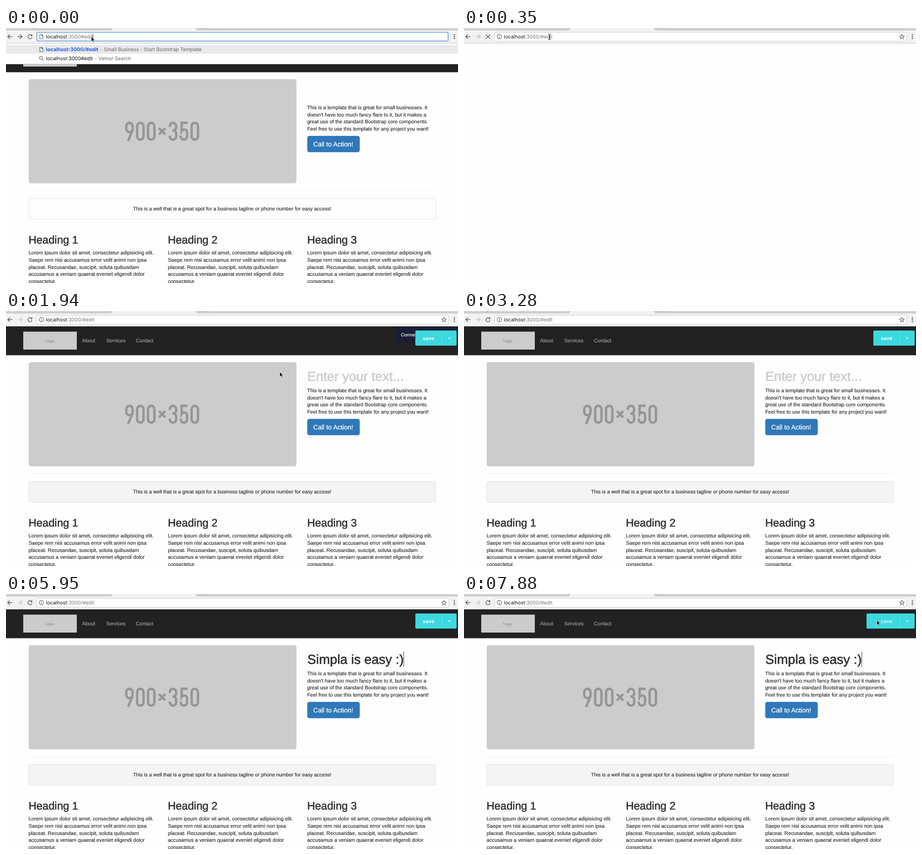
An HTML page that plays this animation: 996 by 562 pixels, repeating every 8000 ms.

```html
<!DOCTYPE html>
<html lang="en">
<head>
<meta charset="utf-8">
<title>Inline page editing</title>
<style>
html, body { margin: 0; width: 100%; height: 100%; overflow: hidden; background: #fefefe; }
svg { display: block; width: 996px; height: 562px; }
text { font-family: "Liberation Sans", Arial, sans-serif; font-size: 11.1px; fill: #2b2b2b;
  stroke: #2b2b2b; stroke-width: .18px; white-space: pre; text-rendering: geometricPrecision; }
.ui { font-family: Inter, Roboto, sans-serif; font-size: 10.9px; fill: #111; stroke: none; }
.dim { fill: #757575; }
.h1 { font-size: 28.95px; stroke-width: .65px; fill: #303030; stroke: #303030; }
.h1.empty { fill: #cbcbcb; stroke: #cbcbcb; }
.h2 { font-size: 24px; stroke: #303030; stroke-width: .6px; fill: #303030; }
.nav { fill: #a3a3a3; stroke: #a3a3a3; }
.icon { fill: none; stroke: #5a5a5a; stroke-width: 1.5; }
.thin { stroke-width: 1.1; }
</style>
</head>
<body>
<svg viewBox="0 0 996 562" xmlns="http://www.w3.org/2000/svg">
  <rect width="996" height="562" fill="#fefefe"/>

  <g id="page">
    <rect y="34" width="996" height="63.5" fill="#222"/>
    <rect x="38" y="45.5" width="118" height="39.5" fill="#ccc"/>
    <text x="85" y="69.3" style="font:bold 9px 'Liberation Mono',monospace;fill:#989898;stroke:none">logo</text>
    <text class="nav" x="167.5" y="69.3">About</text>
    <text class="nav" x="220.7" y="69.3">Services</text>
    <text class="nav" x="286.3" y="69.3">Contact</text>

    <rect x="50" y="112.7" width="590" height="229.6" rx="4.7" fill="#ccc"/>
    <g id="size" fill="none" stroke="#969696" stroke-width="5.3"></g>

    <text id="title" class="h1" x="664" y="154"></text>
    <rect id="caret" y="127" width="1" height="34" fill="#333"/>
    <g id="intro"></g>
    <rect x="663.8" y="237.8" width="115.7" height="36" rx="4.7" fill="#3078b9"/>
    <text x="677" y="260.7" style="font-size:14.4px;fill:#fff;stroke:#fff;stroke-width:.3px">Call to Action!</text>

    <path d="M50 358.5H947" stroke="#ebebeb"/>
    <rect id="well" x="50" y="375.5" width="897" height="46" rx="3" stroke="#e1e1e1"/>
    <text x="498.3" y="402.3" text-anchor="middle">This is a well that is a great spot for a business tagline or phone number for easy access!</text>
    <g id="columns"></g>
  </g>

  <g id="editor">
    <g id="toast">
      <rect x="858" y="34.5" width="138" height="36.5" fill="#1b1f35"/>
      <text class="ui" x="870" y="56" style="font-size:10px;font-weight:500;fill:#fff">Connected</text>
    </g>
    <rect id="save" y="43" height="33.3" rx="2" fill="#3cd9df"/>
    <path d="M960.5 43V76.3" stroke="#62e2e6"/>
    <text id="saveText" class="ui" x="918.5" y="63.8" style="font-size:10.6px;font-weight:700;letter-spacing:.3px;fill:#fff">save</text>
    <path d="M974.3 58.3l2.8 2.8 2.8-2.8" fill="none" stroke="#fff" stroke-width="1.2"/>
  </g>

  <g id="chrome">
    <rect width="996" height="33.5" fill="#f2f2f2"/>
    <path d="M0 0H234L232 4.5H0ZM418 0H996V4.5H422Z" fill="#d3d3d3"/>
    <path d="M0 4.5H231L234 0M418 0L421 4.5H996M50 4.5L53 0" fill="none" stroke="#b4b4b4"/>
    <path d="M423 0H444V1H424Z" fill="#e6e6e6" stroke="#b0b0b0" stroke-width=".7"/>
    <path d="M0 33.5H996" stroke="#c3c3c3"/>
    <path class="icon" d="M14 19H4M8.6 14.2L3.8 19l4.8 4.8"/>
    <path class="icon" id="forward" d="M25.5 19H35.5M30.9 14.2L35.7 19l-4.8 4.8"/>
    <g id="reload">
      <path class="icon" d="M56.5 16.2A4.6 4.6 0 1 0 57.3 20.5"/>
      <path d="M58 13.6V18H53.6Z" fill="#5a5a5a"/>
    </g>
    <path id="stop" class="icon" d="M48.3 14.5l9 9M57.3 14.5l-9 9"/>
    <rect x="67.5" y="9.5" width="907.5" height="19.7" rx="2.5" fill="#fff" stroke="#c9c9c9"/>
    <g fill="#5a5a5a"><circle cx="988" cy="14.8" r="1.4"/><circle cx="988" cy="19" r="1.4"/><circle cx="988" cy="23.2" r="1.4"/></g>
    <text class="ui" x="88" y="23">localhost<tspan id="path" class="dim"></tspan></text>
    <g id="loaded">
      <circle class="icon thin" cx="78" cy="19" r="4.9"/>
      <path class="icon thin" d="M78 18.2V22M78 15.8V17"/>
      <path class="icon thin" id="star"/>
    </g>
  </g>

  <g id="suggest">
    <rect x="68.3" y="9.6" width="905.8" height="18.8" rx="2" fill="none" stroke="#5a9fe0" stroke-width="1.5"/>
    <rect y="34" width="996" height="45.5" fill="#fff"/>
    <rect y="37.3" width="996" height="19.5" fill="#e9e9e9"/>
    <path d="M0 79.5H996" stroke="#b5b5b5"/>
    <g class="icon thin">
      <path d="M74.5 14.5h4.3l2.7 2.7v6.8h-7zM78.6 14.5v2.9h2.9"/>
      <path d="M74.5 42.5h4.3l2.7 2.7v6.8h-7zM78.6 42.5v2.9h2.9"/>
      <circle cx="76.8" cy="65.8" r="3.2"/><path d="M79.2 68.2l3.6 3.6"/>
    </g>
    <text class="ui" x="88" y="51" style="font-size:11.1px;font-weight:700;fill:#2b5fd9">localhost:3000/#edit</text>
    <text class="ui" x="208" y="51" style="font-size:10.83px;fill:#666">- Small Business - Start Bootstrap Template</text>
    <text class="ui" x="88" y="71">localhost:3000#edit</text>
    <text class="ui" x="195.5" y="71" style="fill:#666">- Velnor Search</text>
    <path d="M191.5 13V25" stroke="#111"/>
  </g>

  <path id="arrow" d="M0 0V10.8L2.5 8.5 4.3 12.4 6.1 11.6 4.4 7.8H7.8Z" fill="#000" stroke="#fff" stroke-width=".8"/>
  <path id="beam" d="M-3-6Q0-6 0-4Q0-6 3-6M0-4.5V4.5M-3 6Q0 6 0 4Q0 6 3 6M-1.5 1.5H1.5" fill="none" stroke="#222" stroke-width="1.1"/>
</svg>
<script>
const LOOP = 8000;
const $ = id => document.getElementById(id);
const show = (id, on) => $(id).setAttribute("display", on ? "inline" : "none");
const set = (id, attrs) => { for (const k in attrs) $(id).setAttribute(k, attrs[k]); };
const mix = (a, b, p) => a + (b - a) * p;
const smooth = p => p * p * (3 - 2 * p);

const lines = (rows, x, y, size) => rows.map((row, i) =>
  `<text x="${x}" y="${y + i * 15.75}" style="font-size:${size}px">${row}</text>`).join("");

$("intro").innerHTML = lines([
  "This is a template that is great for small businesses. It",
  "doesn't have too much fancy flare to it, but it makes a",
  "great use of the standard Bootstrap core components.",
  "Feel free to use this template for any project you want!"
], 663.7, 178.8, 11.14);

const lorem = [
  "Lorem ipsum dolor sit amet, consectetur adipisicing elit.",
  "Saepe rem nisi accusamus error velit animi non ipsa",
  "placeat. Recusandae, suscipit, soluta quibusdam",
  "accusamus a veniam quaerat eveniet eligendi dolor",
  "consectetur."
];
$("columns").innerHTML = [1, 2, 3].map(n => {
  const x = 49.7 + (n - 1) * 307;
  return `<text class="h2" x="${x}" y="475">Heading ${n}</text>` + lines(lorem, x, 499.2, 11.22);
}).join("");

// Condensed placeholder lettering, each glyph in a 20 by 43 cell
const glyphs = {
  9: "M7 43L16 21Q17 18 17 15V10a7 7 0 0 0-14 0v6a7 7 0 0 0 13 4",
  0: "M3 10a7 7 0 0 1 14 0v23a7 7 0 0 1-14 0z",
  3: "M3 12v-2a7 7 0 0 1 14 0v3a7 7 0 0 1-8 7a7 7 0 0 1 8 7v6a7 7 0 0 1-14 0v-2",
  5: "M18 3H5V21C8 16 17 16 17 25v8a7 7 0 0 1-14 0v-2",
  x: "M3 14.5l14 14M17 14.5l-14 14"
};
$("size").innerHTML = [..."900x350"].map((c, i) =>
  `<path d="${glyphs[c]}" transform="translate(${262 + i * 24} 206)"/>`).join("");

$("star").setAttribute("d", "M" + Array.from({ length: 10 }, (_, i) => {
  const a = i * Math.PI / 5, r = i % 2 ? 2.3 : 5.4;
  return `${(965 + r * Math.sin(a)).toFixed(2)} ${(19.3 - r * Math.cos(a)).toFixed(2)}`;
}).join("L") + "Z");

// [time, letters typed so far]
const phrase = "Simpla is easy :)";
const typing = [[3580, 2], [3730, 3], [3880, 4], [4020, 6], [4170, 7], [4620, 9], [4770, 10],
  [4910, 12], [5060, 13], [5360, 14], [5510, 15], [5650, 16], [5950, 17]];

// Held steps along a straight line
function travel(t, start, end, steps, from, to, first) {
  const k = Math.min(steps, Math.floor((t - start) / ((end - start) / (steps - 1)) + 1.01));
  const p = smooth((k - first) / (steps - first));
  return [mix(from[0], to[0], p), mix(from[1], to[1], p)];
}

function pointer(t) {
  if (t < 150) return ["arrow", 188, 19];
  if (t < 1070) return ["beam", 188.5, 19.5];
  if (t < 3140) {
    const [x, y] = travel(t, 1070, 2090, 8, [188.5, 19.5], [680, 155.5], 0);
    return [y < 30 || x > 660 ? "beam" : "arrow", x, y];
  }
  if (t < 6550) return [null, 0, 0];
  return ["arrow", ...travel(t, 6550, 7280, 6, [939, 5], [909.5, 57.8], 1)];
}

function draw(t) {
  const asking = t < 150, editing = t >= 500;
  const blank = t >= 350 && t < 500;
  show("suggest", asking);
  show("loaded", !asking);
  show("page", !blank);
  show("editor", editing);
  show("toast", t < 2390);
  show("stop", !asking && !editing);
  show("reload", asking || editing);
  $("path").textContent = asking ? ":3000#edit" : ":3000/#edit";
  set("forward", { opacity: asking ? 1 : .3 });
  set("well", { fill: editing ? "#f4f4f4" : "#fdfdfd" });

  let count = 0;
  for (const [at, n] of typing) if (t >= at) count = n;
  const title = $("title");
  title.textContent = count ? phrase.slice(0, count) : editing ? "Enter your text..." : "";
  title.setAttribute("class", count ? "h1" : "h1 empty");
  const caretOn = (t >= 2840 && t < 3280) || (t >= 3580 && t < 6550) || t >= 7140;
  show("caret", caretOn);
  if (caretOn) set("caret", { x: Math.floor(664 + (count ? title.getComputedTextLength() : 0)) });

  const busy = t < 7580 ? 0 : t < 7730 ? .4 : t < 7880 ? .8 : 1;
  const left = mix(902, 887, busy);
  set("save", { x: left, width: 993 - left });
  set("saveText", { opacity: 1 - .3 * busy });

  const [kind, x, y] = pointer(t);
  for (const id of ["arrow", "beam"]) {
    show(id, id === kind);
    set(id, { transform: `translate(${x} ${y})` });
  }
}

const begin = performance.now();
function tick() {
  draw((performance.now() - begin) % LOOP);
  requestAnimationFrame(tick);
}
tick();
</script>
</body>
</html>
```
